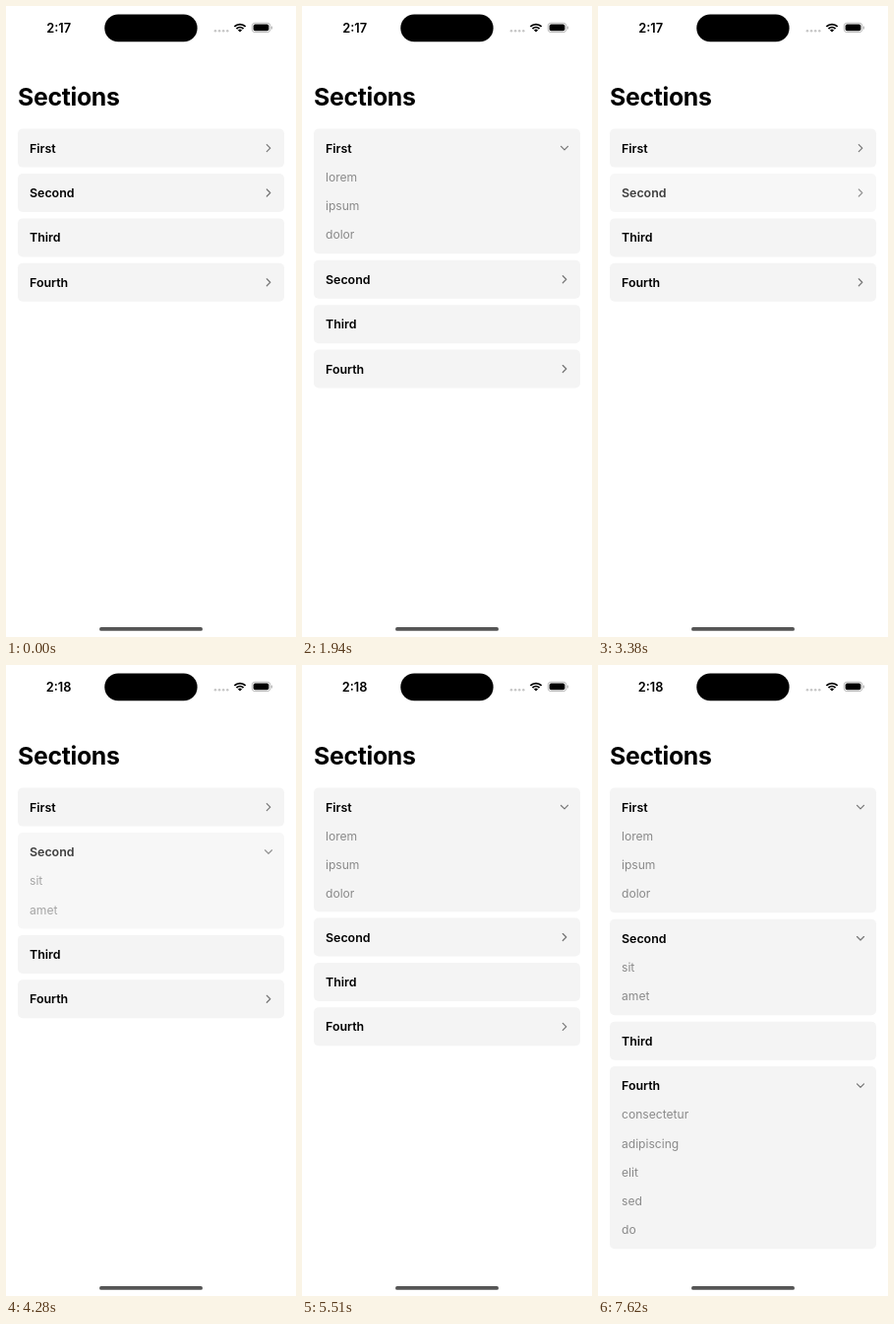
These frames come from a looping animation (295 by 640 pixels, 8000 ms). An HTML page with a canvas:

```html
<!DOCTYPE html>
<html lang="en">
<head>
<meta charset="utf-8">
<title>Sections</title>
<style>
  html, body { margin: 0; width: 100%; height: 100%; overflow: hidden; background: #fff; }
  canvas { display: block; width: 295px; height: 640px; }
</style>
</head>
<body>
<canvas id="stage"></canvas>
<script>
const W = 295, H = 640, LOOP = 8000;
const FONT = 'Inter, "Liberation Sans", sans-serif';
const HEAD = 39, ROW = 29.25, GAP = 6.4, TOP = 124.6, LEFT = 12, WIDTH = 271;

const sections = [
  { title: 'First', items: ['lorem', 'ipsum', 'dolor'] },
  { title: 'Second', items: ['sit', 'amet'] },
  { title: 'Third', items: [] },
  { title: 'Fourth', items: ['consectetur', 'adipiscing', 'elit', 'sed', 'do'] }
];

const taps = [
  { section: 0, start: 1490, end: 1940, steps: 5, open: true },
  { section: 0, start: 2540, end: 2970, steps: 5, open: false },
  { section: 1, start: 3380, end: 3820, steps: 5, open: true },
  { section: 1, start: 4280, end: 4730, steps: 5, open: false },
  { section: 0, start: 5270, end: 5720, steps: 5, open: true },
  { section: 1, start: 6170, end: 6630, steps: 5, open: true },
  { section: 3, start: 7310, end: 7620, steps: 4, open: true }
];

const canvas = document.getElementById('stage');
const ctx = canvas.getContext('2d');
const dpr = window.devicePixelRatio || 1;
canvas.width = Math.round(W * dpr);
canvas.height = Math.round(H * dpr);

// Critically damped spring, starting shortly after touch-down.
function spring(ms) {
  const x = Math.max(0, ms - 40) * 0.034;
  return 1 - (1 + x) * Math.exp(-x);
}

function pressAlpha(ms) {
  const x = Math.min(1, ms / 225);
  return 0.75 + 0.25 * x * x;
}

function stateAt(index, t) {
  const state = { open: 0, alpha: 1 };
  for (const tap of taps) {
    if (tap.section !== index || t < tap.start) continue;
    let p = 1;
    state.alpha = 1;
    if (t < tap.end) {
      // The motion advances in discrete steps.
      const step = (tap.end - tap.start) / (tap.steps - 1);
      const ms = Math.floor((t - tap.start) / step + 0.02) * step;
      p = spring(ms);
      state.alpha = pressAlpha(ms);
    }
    state.open = tap.open ? p : 1 - p;
  }
  return state;
}

function text(str, x, y, size, weight, color, align = 'left', spacing = 0) {
  ctx.font = `${weight} ${size}px ${FONT}`;
  ctx.letterSpacing = spacing + 'px';
  ctx.textAlign = align;
  ctx.fillStyle = color;
  ctx.fillText(str, x, y);
}

function pill(x, y, w, h, r, color) {
  ctx.beginPath();
  ctx.roundRect(x, y, w, h, r);
  ctx.fillStyle = color;
  ctx.fill();
}

function chevron(x, y, turn) {
  ctx.save();
  ctx.translate(x, y);
  ctx.rotate(turn * Math.PI / 2);
  ctx.beginPath();
  ctx.moveTo(-1.7, -3.5);
  ctx.lineTo(1.8, 0);
  ctx.lineTo(-1.7, 3.5);
  ctx.strokeStyle = '#777';
  ctx.lineWidth = 1.25;
  ctx.lineCap = ctx.lineJoin = 'round';
  ctx.stroke();
  ctx.restore();
}

function wifi(x, y) {
  const from = -Math.PI * 0.75, to = -Math.PI * 0.25;
  ctx.strokeStyle = ctx.fillStyle = '#000';
  ctx.lineWidth = 1.8;
  ctx.lineCap = 'butt';
  for (const r of [8, 5]) {
    ctx.beginPath();
    ctx.arc(x, y, r, from, to);
    ctx.stroke();
  }
  ctx.beginPath();
  ctx.moveTo(x, y);
  ctx.arc(x, y, 2.9, from, to);
  ctx.fill();
}

function statusBar(t) {
  text(t < 4280 ? '2:17' : '2:18', 53.6, 26.6, 12.8, 600, '#000', 'center');
  pill(100.3, 8.5, 94.3, 27.8, 13.9, '#000');
  for (let i = 0; i < 4; i++) pill(211.7 + i * 4.1, 23.9, 2.5, 2.5, 1.25, '#c6c6c6');
  wifi(238, 26.6);
  ctx.beginPath();
  ctx.roundRect(250.2, 17.2, 18.6, 9.4, 3);
  ctx.strokeStyle = '#a8a8a8';
  ctx.lineWidth = 0.8;
  ctx.stroke();
  pill(251.6, 18.6, 15.8, 6.6, 1.8, '#000');
  pill(269.7, 20.4, 1.1, 3, 0.5, '#a8a8a8');
}

function card(section, y, state) {
  const h = HEAD + section.items.length * ROW * state.open;
  ctx.save();
  ctx.globalAlpha = state.alpha;
  pill(LEFT, y, WIDTH, h, 5, '#f4f4f4');
  ctx.clip();
  text(section.title, 24, y + 24, 12.4, 600, '#000');
  if (section.items.length) chevron(267, y + 19.5, state.open);
  if (state.open > 0) {
    section.items.forEach((item, i) =>
      text(item, 24, y + 24 + (i + 1) * ROW, 12.1, 400, '#8a8a8a'));
  }
  ctx.restore();
  return h;
}

function draw(t) {
  ctx.setTransform(dpr, 0, 0, dpr, 0, 0);
  ctx.fillStyle = '#fff';
  ctx.fillRect(0, 0, W, H);
  statusBar(t);
  text('Sections', 12, 100.7, 24.8, 700, '#000', 'left', -0.3);
  let y = TOP;
  sections.forEach((section, i) => {
    y += card(section, y, stateAt(i, t)) + GAP;
  });
  pill(95, 630, 105, 3.8, 1.9, '#555');
}

const began = performance.now();
function tick() {
  draw((performance.now() - began) % LOOP);
  requestAnimationFrame(tick);
}
tick();
</script>
</body>
</html>
```
